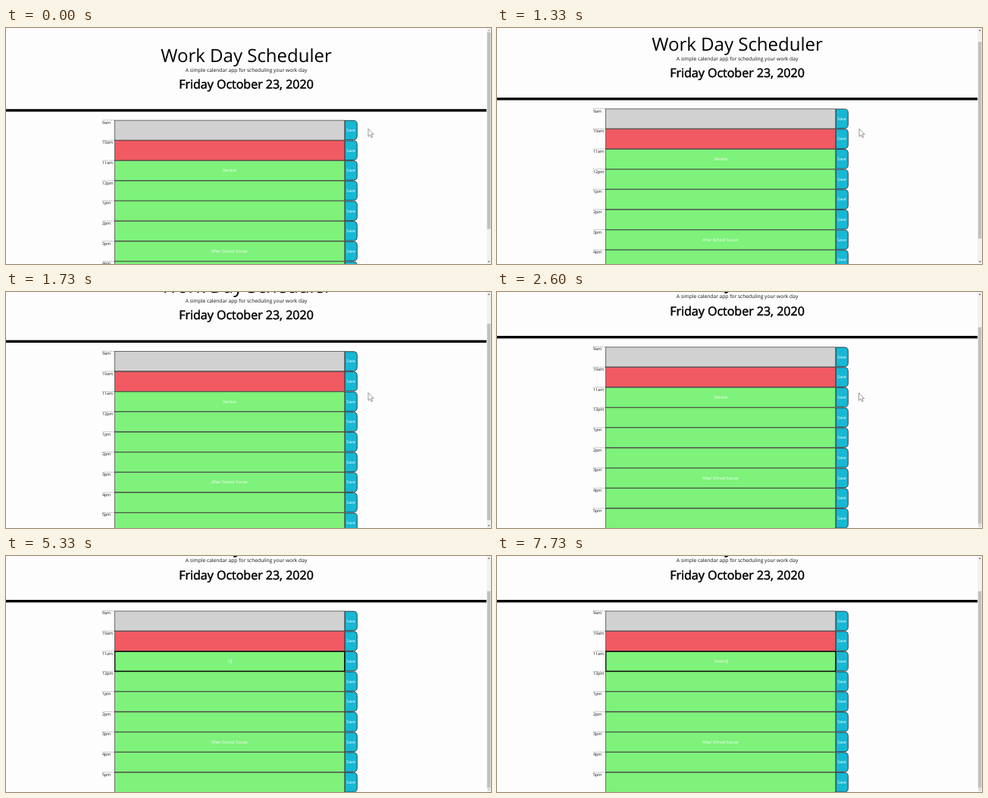
Recreate the animation shown at these times as an HTML page. Size 640 by 312 pixels, loop 8 s.

```html
<!DOCTYPE html>
<html lang="en">
<head>
<meta charset="utf-8">
<title>Work Day Scheduler</title>
<style>
  html, body { margin: 0; width: 100%; height: 100%; overflow: hidden; background: #fdfdfd; }
  svg { display: block; width: 100%; height: 100%; }
  text { font: 5.333px "Open Sans", "Noto Sans", sans-serif; text-rendering: geometricPrecision; fill: #111; }
  .mid { text-anchor: middle; }
  .light { fill: #fff; }
  .title { font-size: 24px; fill: #000; }
  .lead { font-size: 6.667px; }
  .date { font-size: 16px; fill: #000; stroke: #000; stroke-width: .5px; }
  .box { stroke: #333; stroke-width: .7; }
  .past { fill: #d1d1d1; }
  .present { fill: #f15a62; }
  .future { fill: #7ef27b; }
  .save { fill: #16b8d4; stroke: #222; stroke-width: .8; }
  .hour { stroke: #333; stroke-width: .4; stroke-dasharray: 1 .5; }
</style>
</head>
<body>
<svg viewBox="0 0 640 312" preserveAspectRatio="none">
  <g id="page">
    <text class="mid title" x="317" y="45">Work Day Scheduler</text>
    <text class="mid lead" x="317" y="57.7">A simple calendar app for scheduling your work day</text>
    <text class="mid date" x="317" y="80">Friday October 23, 2020</text>
    <rect y="107.2" width="634.3" height="3.4"/>
    <g id="rows"></g>
    <rect id="focus" x="143.7" width="303.2" height="26" fill="none" stroke="#000" stroke-width="1.2"/>
    <rect id="selection" height="7.3" fill="#3390ff"/>
    <text id="entry" class="mid light" x="295.2"></text>
    <rect id="caret" width=".5" height="7" fill="#fff"/>
  </g>
  <rect x="634.3" width="5.7" height="312" fill="#f1f1f1"/>
  <rect id="thumb" x="634.9" width="4.4" height="260" fill="#c1c1c1"/>
  <path id="up" d="M635.8 3.7h2.8l-1.4-1.6z"/>
  <path id="down" d="M635.8 308.3h2.8l-1.4 1.6z"/>
  <path id="arrow" d="M0 0V10.2L2.4 8 4 11.6 5.6 10.9 4.1 7.4H7.2Z" fill="#fff" stroke="#333" stroke-width=".5"/>
  <path id="beam" d="M-1.5-4H1.5M0-4V4M-1.5 4H1.5" fill="none" stroke="#222" stroke-width=".6"/>
</svg>
<script>
const LOOP = 8000, TOP = 121.8, PITCH = 80 / 3, MAX_SCROLL = 49.2;
const EDIT_ROW = 2, MID_X = 295.2;
const HOURS = ['9am', '10am', '11am', '12pm', '1pm', '2pm', '3pm', '4pm', '5pm'];
const EVENTS = { '3pm': 'After School Soccer' };
const FOCUS = 4400, SELECT = 4530, BLINK = 530;
const WORD = 'Doctor', KEY_TIMES = [5330, 5930, 6530, 6730, 7660, 7730];

const $ = id => document.getElementById(id);
const set = (id, attrs) => {
  for (const name in attrs) $(id).setAttribute(name, attrs[name]);
};
const show = (id, visible) => set(id, { visibility: visible ? 'visible' : 'hidden' });
const ease = (t, from, to) => {
  const u = Math.min(1, Math.max(0, (t - from) / (to - from)));
  return u * u * (3 - 2 * u);
};

$('rows').innerHTML = HOURS.map((hour, i) => {
  const y = TOP + i * PITCH, base = y + 15.2;
  const kind = ['past', 'present'][i] || 'future';
  return `<path class="hour" d="M127 ${y}h16.4"/>
    <text x="127" y="${y + 4.9}">${hour}</text>
    <rect class="box ${kind}" x="143.6" y="${y + .3}" width="303.3" height="26.1"/>
    <path class="save" d="M447.3 ${y + .5}h11.2q4.8 0 4.8 4.8v16q0 4.8-4.8 4.8h-11.2z"/>
    <text class="mid light" x="455" y="${base}">Save</text>
    <text class="mid light" x="${MID_X}" y="${base}">${EVENTS[hour] || ''}</text>`;
}).join('');

const rowY = TOP + EDIT_ROW * PITCH;
set('focus', { y: rowY + .35 });
set('entry', { y: rowY + 15.2 });
set('selection', { y: rowY + 9.7 });
set('caret', { y: rowY + 9.8 });

function draw(t) {
  // Two wheel clicks; the second one reaches the bottom of the page.
  const wheel = 100 / 3;
  const scroll = wheel * ease(t, 1190, 1490) + (MAX_SCROLL - wheel) * ease(t, 1540, 1860);
  set('page', { transform: `translate(0 ${-scroll})` });
  set('thumb', { y: 5.7 + scroll * .83 });
  set('up', { fill: scroll > 0 ? '#505050' : '#a3a3a3' });
  set('down', { fill: scroll < MAX_SCROLL - .1 ? '#505050' : '#a3a3a3' });

  const typed = KEY_TIMES.filter(k => k <= t).length;
  $('entry').textContent = typed ? WORD.slice(0, typed) : 'Dentist';
  const width = $('entry').getComputedTextLength();
  const lastKey = typed ? KEY_TIMES[typed - 1] : FOCUS;
  const selected = t >= SELECT && !typed;
  show('focus', t >= FOCUS);
  show('selection', selected);
  set('selection', { x: MID_X - width / 2, width });
  show('caret', t >= FOCUS && !selected && t - lastKey < BLINK);
  set('caret', { x: MID_X + width / 2 });

  const move = ease(t, 2560, 3960);
  const x = 478 - 180 * move, y = 133.3 + 6 * move;
  const overField = x > 143 && x < 447;
  show('arrow', !overField);
  show('beam', overField && !typed);
  for (const id of ['arrow', 'beam']) set(id, { transform: `translate(${x} ${y})` });
}

function tick() {
  draw(performance.now() % LOOP);
  requestAnimationFrame(tick);
}
tick();
</script>
</body>
</html>
```
